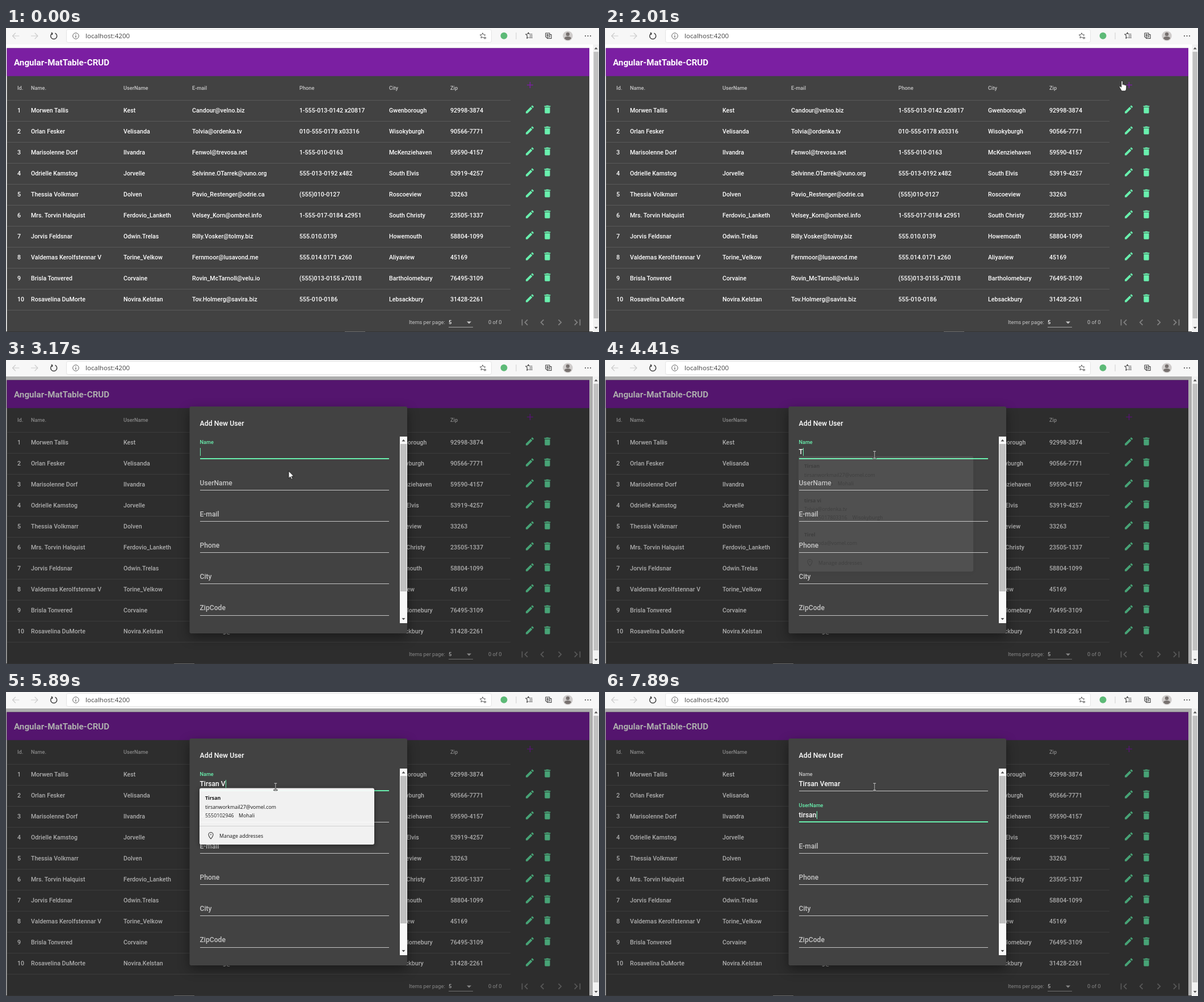
These frames come from a looping animation (1045 by 536 pixels, 8 s). An HTML page:

```html
<!DOCTYPE html>
<html lang="en">
<head>
<meta charset="utf-8">
<title>Angular-MatTable-CRUD</title>
<style>
  html, body { margin: 0; width: 100%; height: 100%; overflow: hidden; background: #fff; }
  svg { display: block; width: 1045px; height: 536px; }
  text { font-family: Roboto, sans-serif; white-space: pre; }
  .sys { font-family: "Open Sans", sans-serif; }
  .medium { font-weight: 500; }
  .bold { font-weight: 700; }
  .loop { animation: 8s linear infinite; }

  #ripple { animation-name: ripple; transform-origin: 923px 100px; }
  #shade { animation-name: shade; }
  #dialog { animation-name: dialog; transform-origin: 515px 282px; filter: drop-shadow(0 7px 10px rgba(0,0,0,.4)); }
  #popup { animation-name: popup; filter: drop-shadow(0 2px 4px rgba(0,0,0,.45)); }
  #label0 { animation-name: label0; }
  #label1 { animation-name: label1; }
  #line0 { animation-name: line0; transform-origin: 508.5px 0; }
  #line1 { animation-name: line1; transform-origin: 508.5px 0; }
  #cursor { animation-name: move; }
  #arrow { animation-name: arrow; animation-timing-function: step-end; }
  #hand { animation-name: hand; animation-timing-function: step-end; }
  #beam { animation-name: beam; animation-timing-function: step-end; }
  #mark { animation-name: mark; animation-timing-function: step-end; }

  @keyframes mark { 0% { transform: none } 33%, 100% { transform: translateX(-301px) } }
  @keyframes ripple {
    0%, 32.8% { opacity: 0; transform: scale(.2) }
    34.9% { opacity: .2; transform: scale(1) }
    39.5%, 100% { opacity: 0; transform: scale(1) }
  }
  @keyframes shade {
    0%, 34.25% { opacity: 0; animation-timing-function: cubic-bezier(.25,.8,.25,1) }
    39.25%, 100% { opacity: .32 }
  }
  @keyframes dialog {
    0%, 34.25% { opacity: 0; transform: scale(.7); animation-timing-function: cubic-bezier(0,0,.2,1) }
    36.125%, 100% { opacity: 1; transform: scale(1) }
  }
  @keyframes popup { 0%, 55% { opacity: 0 } 56.9%, 73.5% { opacity: 1 } 75.5%, 100% { opacity: 0 } }
  @keyframes label0 {
    0%, 36.125% { transform: translateY(0) scale(1); fill: #c6c6c6; animation-timing-function: cubic-bezier(.25,.8,.25,1) }
    41.125%, 86.9% { transform: translateY(-18px) scale(.75); fill: #69f0ae }
    91%, 100% { transform: translateY(-18px) scale(.75); fill: #c6c6c6 }
  }
  @keyframes label1 {
    0%, 86.9% { transform: translateY(0) scale(1); fill: #c6c6c6; animation-timing-function: cubic-bezier(.25,.8,.25,1) }
    91.9%, 100% { transform: translateY(-18px) scale(.75); fill: #69f0ae }
  }
  @keyframes line0 {
    0%, 36.125% { opacity: 0; transform: scaleX(.5); animation-timing-function: cubic-bezier(.25,.8,.25,1) }
    39.9%, 86.9% { opacity: 1; transform: scaleX(1) }
    90%, 100% { opacity: 0; transform: scaleX(1) }
  }
  @keyframes line1 {
    0%, 86.9% { opacity: 0; transform: scaleX(.5); animation-timing-function: cubic-bezier(.25,.8,.25,1) }
    90.7%, 100% { opacity: 1; transform: scaleX(1) }
  }
  @keyframes move {
    0%, .8% { transform: translate(985px,545px); animation-timing-function: ease-in-out }
    9% { transform: translate(448px,308px) }
    10.6% { transform: translate(453px,301px); animation-timing-function: ease-in-out }
    21.2% { transform: translate(880px,96px) }
    25.1% { transform: translate(911px,93px) }
    29%, 35% { transform: translate(923px,102px); animation-timing-function: ease-in-out }
    39.5% { transform: translate(500px,198px); animation-timing-function: ease-out }
    42.5%, 100% { transform: translate(475px,167px) }
  }
  @keyframes arrow { 0%, 34.25% { opacity: 1 } 22.2%, 41.2%, 100% { opacity: 0 } }
  @keyframes hand { 0%, 34.25%, 100% { opacity: 0 } 22.2% { opacity: 1 } }
  @keyframes beam { 0% { opacity: 0 } 41.2%, 100% { opacity: 1 } }
</style>
</head>
<body>
<script>
const WHITE = '#fff', SOFT = '#c6c6c6', MINT = '#69f0ae', PURPLE = '#7b1fa2';

const rect = (x, y, w, h, fill, more = '') =>
  `<rect x="${x}" y="${y}" width="${w}" height="${h}" fill="${fill}" ${more}/>`;
const path = (d, more = '') => `<path d="${d}" ${more}/>`;
const outline = (d, color, width = 1.1) =>
  path(d, `fill="none" stroke="${color}" stroke-width="${width}" stroke-linecap="round" stroke-linejoin="round"`);
// cy is the middle of the capitals; baselines sit on whole pixels
const baseline = (cy, size) => Math.round(cy + size * .355);
const text = (x, cy, str, size, fill = WHITE, style = '') =>
  `<text x="${x}" y="${baseline(cy, size)}" font-size="${size}" fill="${fill}" class="${style}">${str}</text>`;
const icon = (cx, cy, size, d, fill) =>
  path(d, `fill="${fill}" transform="translate(${cx - size / 2} ${cy - size / 2}) scale(${size / 24})"`);
const group = (id, body, more = '') => `<g id="${id}" ${more}>${body}</g>`;

const ICONS = {
  edit: 'M3 17.25V21h3.75L17.81 9.94l-3.75-3.75zM20.71 7.04c.39-.39.39-1.02 0-1.41l-2.34-2.34c-.39-.39-1.02-.39-1.41 0l-1.83 1.83 3.75 3.75z',
  remove: 'M6 19c0 1.1.9 2 2 2h8c1.1 0 2-.9 2-2V7H6zM19 4h-3.5l-1-1h-5l-1 1H5v2h14z',
  add: 'M19 13h-6v6h-2v-6H5v-2h6V5h2v6h6z',
  first: 'M18.41 16.59L13.82 12l4.59-4.59L17 6l-6 6 6 6zM6 6h2v12H6z',
  prev: 'M15.41 7.41L14 6l-6 6 6 6 1.41-1.41L10.83 12z',
  next: 'M10 6L8.59 7.41 13.17 12l-4.58 4.59L10 18l6-6z',
  last: 'M5.59 7.41L10.18 12l-4.59 4.59L7 18l6-6-6-6zM16 6h2v12h-2z'
};
const COLUMNS = [20, 44, 207, 328, 517, 675, 783];
const HEADS = ['Id.', 'Name.', 'UserName', 'E-mail', 'Phone', 'City', 'Zip'];
const USERS = `Morwen Tallis|Kest|Candour@velno.biz|1-555-013-0142 x20817|Gwenborough|92998-3874
Orlan Fesker|Velisanda|Tolvia@ordenka.tv|010-555-0178 x03316|Wisokyburgh|90566-7771
Marisolenne Dorf|Ilvandra|Fenwol@trevosa.net|1-555-010-0163|McKenziehaven|59590-4157
Odrielle Kamstog|Jorvelle|Selvinne.OTarrek@vuno.org|555-013-0192 x482|South Elvis|53919-4257
Thessia Volkmarr|Dolven|Pavio_Restenger@odrie.ca|(555)010-0127|Roscoeview|33263
Mrs. Torvin Halquist|Ferdovio_Lanketh|Velsey_Korn@ombrel.info|1-555-017-0184 x2951|South Christy|23505-1337
Jorvis Feldsnar|Odwin.Trelas|Rilly.Vosker@tolmy.biz|555.010.0139|Howemouth|58804-1099
Valdemas Kerolfstennar V|Torine_Velkow|Fernmoor@lusavond.me|555.014.0171 x260|Aliyaview|45169
Brisla Tonvered|Corvaine|Rovin_McTarnoll@velu.io|(555)013-0155 x70318|Bartholomebury|76495-3109
Rosavelina DuMorte|Novira.Kelstan|Tov.Holmerg@savira.biz|555-010-0186|Lebsackbury|31428-2261`
  .split('\n').map((row, i) => [i + 1, ...row.split('|')]);

function scrollbar(x, y, w, h, top, bottom, track) {
  const cx = x + w / 2;
  return rect(x, y, w, h, track) + rect(x + 1, top, w - 2, bottom - top, '#c1c1c1') +
    path(`M${cx - 3} ${y + 8.5}h6l-3-3.4z`, 'fill="#505050"') +
    path(`M${cx - 3} ${y + h - 9}h6l-3 3.4z`, 'fill="#505050"');
}

function browserBar() {
  const dark = '#3b3b3b', pale = '#cbcbcb';
  return rect(0, 0, 1045, 29, '#f7f7f7') +
    rect(106.5, 2.5, 749, 23, WHITE, 'rx="3" stroke="#e4e4e4"') +
    outline('M23 14H11.500M16.500 9l-5 5 5 5', pale) +
    outline('M44.500 14H56M51 9l5 5-5 5', pale) +
    outline('M81.500 9.300a5.500 5.500 0 1 0 5.500 0M80.300 8.300l1.600 1-.5 2.300', dark, 1.4) +
    `<circle cx="123" cy="14" r="5.300" fill="none" stroke="#666"/>` +
    outline('M123 13.500v3M123 11.300v.1', '#555', 1.2) +
    text(140, 14, 'localhost:4200', 11.6, '#444', 'sys') +
    outline('M842 17.200l-2-1.200-3 1.800.7-3.400-2.500-2.300 3.400-.4 1.400-3 1.400 3 3.400.4-1.500 1.500M844 15.500v4M842 17.500h4', '#555', 1) +
    `<circle cx="877.500" cy="13.800" r="6" fill="#5dba77"/>` +
    rect(898.5, 8, 1, 12, '#d0d0d0') +
    outline('M915.500 11l3.500-.2 1.600-2.800 1.500 2.800 5 .2M916 11l2.500 2.700-.6 4.500 2.300-1.400M923 14h4.500M922 17h5.500', dark) +
    outline('M951 9h7v7h-7zM953.500 16v2.500h7.500v-7h-3M954.500 10.500v4M952.500 12.500h4', dark) +
    `<circle cx="990" cy="14" r="8.700" fill="#cfcccb"/><circle cx="990" cy="11" r="3.200" fill="#77716f"/>` +
    path('M984 18.500q0-3.500 6-3.500t6 3.500q-2.300 2.700-6 2.700t-6-2.700z', 'fill="#77716f"') +
    [1021, 1025.5, 1030].map(x => `<circle cx="${x}" cy="14" r="1" fill="${dark}"/>`).join('');
}

function page() {
  const rows = USERS.map((user, i) => {
    const y = 145 + i * 37;
    return user.map((cell, c) => text(COLUMNS[c], y, cell, 10.65, WHITE, 'medium')).join('') +
      icon(923, y - 1.5, 18.5, ICONS.edit, MINT) + icon(954, y - 1.5, 18.5, ICONS.remove, MINT);
  }).join('');
  const lines = Array.from({ length: 11 }, (_, i) => rect(2, 127 + i * 37, 887, 1, '#595959')).join('');
  const pager = ['first', 'prev', 'next', 'last']
    .map((name, i) => icon(914 + i * 31, 519, 21.5, ICONS[name], '#808080')).join('');
  return rect(0, 29, 1034, 507, WHITE) + rect(1.5, 35.5, 1026.5, 501, '#424242') + rect(1.5, 35.5, 1026.5, 49.3, PURPLE) +
    text(14, 60.5, 'Angular-MatTable-CRUD', 15.2, WHITE, 'bold') +
    HEADS.map((head, c) => text(COLUMNS[c], 105.5, head, 9.24, SOFT, 'medium')).join('') +
    lines + rows +
    icon(923.5, 100.5, 18.5, ICONS.add, PURPLE) +
    `<circle id="ripple" class="loop" cx="923" cy="100" r="15.400" fill="${PURPLE}"/>` +
    text(710, 519, 'Items per page:', 9.24, SOFT) + text(780, 519, '5', 9.24, WHITE, 'medium') +
    path('M812 517.500h8l-4 4z', `fill="${SOFT}"`) + rect(780, 527, 43, 1, '#a5a5a5') +
    text(850, 519, '0 of 0', 9.24, SOFT) + pager;
}

function dialog() {
  const fields = ['Name', 'UserName', 'E-mail', 'Phone', 'City', 'ZipCode'].map((name, i) => {
    const y = 161.3 + i * 55.15;
    const base = baseline(y, 12.15);
    const active = i < 2
      ? `<text id="input${i}" class="medium" x="341.500" y="${base}" font-size="12.150" fill="${WHITE}"></text>` +
        rect(342, Math.round(y + 11.7), 333, 2, MINT, `id="line${i}" class="loop"`)
      : '';
    return rect(342, Math.round(y + 12.5), 333, 1, SOFT) +
      `<g transform="translate(341.500 ${base})"><text id="label${i}" class="loop medium" font-size="12.150" fill="${SOFT}">${name}</text></g>` +
      active;
  }).join('');
  return rect(323.5, 82, 383.5, 400, '#424242', 'rx="3"') +
    text(341.5, 111.5, 'Add New User', 12.3, WHITE, 'medium') + fields +
    scrollbar(694, 135, 13, 329, 148, 408, '#f8f8f8') +
    rect(342, 155, 1, 14, MINT, 'id="caret"');
}

const CARDS = [
  ['Tirsan', 'tirsanworkmail27@vomel.com', '5550102946', 'Mohali', 410],
  ['tirsa vi', 'Tolvia@ordenka.tv', '010555017803316', 'Wisokyburgh', 436],
  ['Tirel', 'tirelmoda@vomel.com']
];

function popup() {
  const line = (x, y, str, style = '') => text(x, y, str, 8.85, '#111', 'sys ' + style);
  const cards = CARDS.map(([name, mail, phone, city, cityX], i) => {
    const y = 187.3 + i * 60.2;
    return group('card' + i, line(351, y, name, 'bold') + line(351, y + 15.5, mail) +
      (phone ? line(351, y + 30.7, phone) + line(cityX, y + 30.7, city) : ''));
  }).join('');
  const footer = rect(341, 176, 308, 1, '#dcdcdc') +
    outline('M361 199q-4-4.700-4-7.500a4 4 0 0 1 8 0q0 2.800-4 7.500zM361 190.300v1.800', '#333', 1.1) +
    line(376, 193.6, 'Manage addresses');
  return rect(341, 169.5, 308, 159.5, WHITE, 'id="sheet" rx="3"') + cards + group('footer', footer);
}

const cursor = group('arrow', path('M0 0V13l3-2.800 2 4.600 2-.9-2-4.500h4.200z', 'fill="#fff" stroke="#000" stroke-width=".8"'), 'class="loop"') +
  group('hand', path('M-1.300 11V1.200a1.300 1.300 0 0 1 2.600 0V7a1.100 1.100 0 0 1 2.300 0v.6a1.100 1.100 0 0 1 2.200 0v.6a1 1 0 0 1 2 0V13q0 3-2 5h-6.500q-1-2-3.600-6-1.200-2 .2-2.400 1.500 0 2.800 1.600z',
    'fill="#fff" stroke="#000" stroke-width=".8"'), 'class="loop"') +
  group('beam', ['#222 2.4', '#d8d8d8 1'].map(s => outline('M-2.500-6h5M0-6V6M-2.500 6h5', ...s.split(' '))).join(''), 'class="loop"');

document.body.innerHTML = `<svg viewBox="0 0 1045 536">${
  page() +
  rect(0, 29, 1034, 507, '#000', 'id="shade" class="loop"') +
  rect(0, 535, 1034, 1, '#333') + rect(597, 535, 36, 1, '#6a6a6a', 'id="mark" class="loop"') +
  scrollbar(1034.5, 29, 10.5, 507, 42, 512, '#f1f1f1') +
  browserBar() +
  group('dialog', dialog(), 'class="loop"') +
  group('popup', popup(), 'class="loop"') +
  group('cursor', cursor, 'class="loop"')
}</svg>`;

const $ = id => document.getElementById(id);
const TYPING = [
  ['Tirsan Vemar', [4410, 4550, 4720, 4880, 4960, 5190, 5340, 5890, 6270, 6420, 6500, 6650]],
  ['tirsan', [7270, 7420, 7510, 7600, 7740, 7890]]
];

function draw(t) {
  TYPING.forEach(([str, keys], i) => {
    $('input' + i).textContent = str.slice(0, keys.filter(k => k <= t).length);
  });
  const field = t < 6960 ? 0 : 1;
  const caret = $('caret');
  caret.setAttribute('x', 342 + Math.round($('input' + field).getComputedTextLength()));
  caret.setAttribute('y', field ? 210 : 155);
  caret.style.opacity = t < 2890 || (t >= 3480 && t < 3940) ? 0 : 1;

  const count = t < 4880 ? 3 : t < 5190 ? 2 : 1;
  const height = [60, 120, 164][count - 1];
  CARDS.forEach((_, i) => $('card' + i).style.display = i < count ? '' : 'none');
  $('sheet').setAttribute('height', height + 39.5);
  $('footer').setAttribute('transform', `translate(0 ${height})`);
}

let start;
function tick(now) {
  start ??= now;
  draw((now - start) % 8000);
  requestAnimationFrame(tick);
}
draw(0);
requestAnimationFrame(tick);
</script>
</body>
</html>
```
